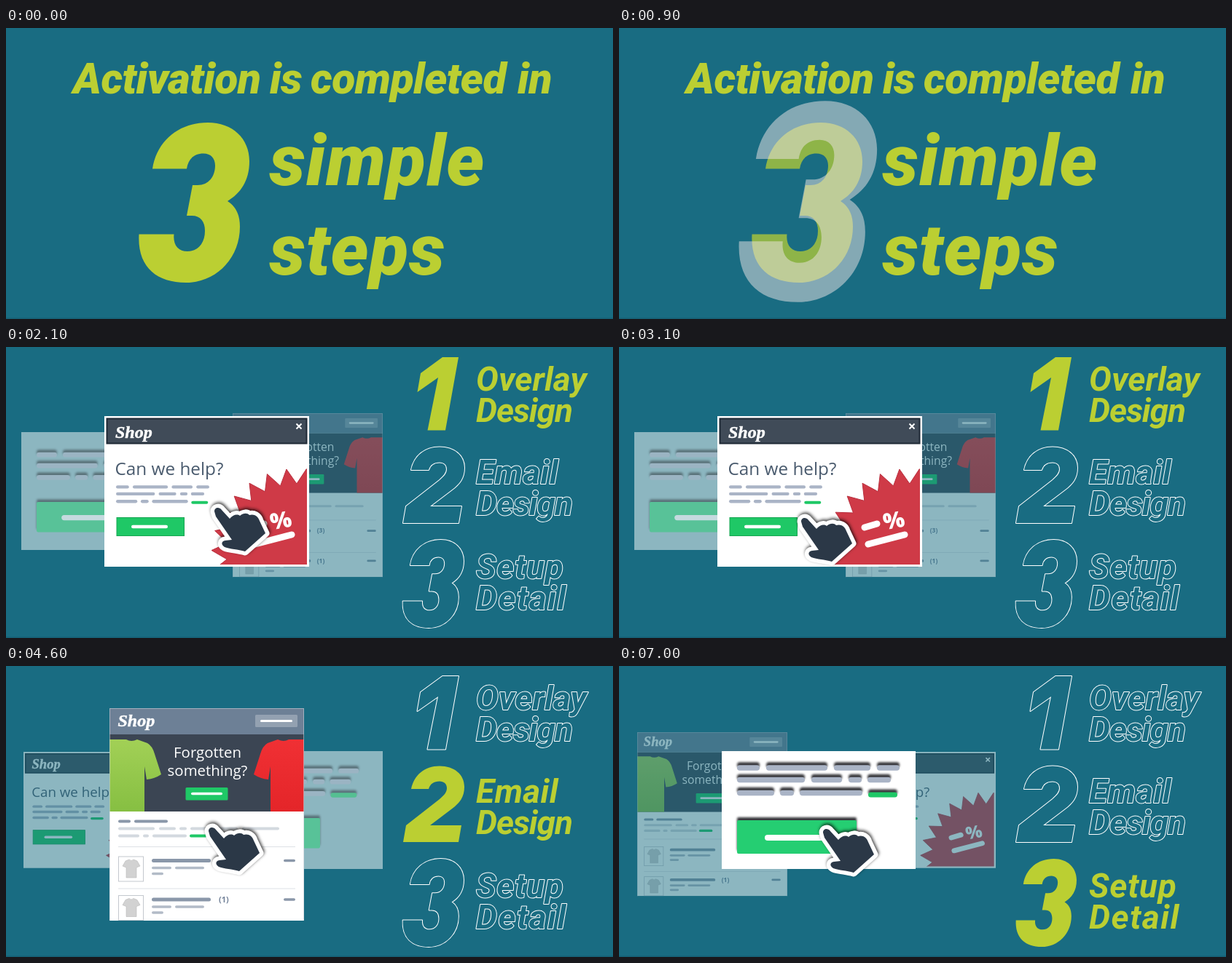
Write an HTML page that moves like this. It is 833 px wide and 400 px high and loops after 7500 ms.

```html
<!DOCTYPE html>
<html lang="en">
<head>
<meta charset="utf-8">
<title>Activation in 3 simple steps</title>
<style>
  html, body { margin: 0; width: 100%; height: 100%; overflow: hidden; background: #196c82; }
  svg { display: block; }
  .head { font: italic 900 59px Roboto, "Open Sans", sans-serif; letter-spacing: -.6px; fill: #bbcf32; }
  .big { font-size: 98px; letter-spacing: 1.2px; }
  .step text { font: italic 700 46px Roboto, "Open Sans", sans-serif; }
  .step { fill: #196c82; stroke: #fff; stroke-width: 2; paint-order: stroke; stroke-linejoin: round; }
  .step.on { fill: #bbcf32; stroke: none; }
  .logo { font: italic 700 24px "Liberation Serif", "Noto Serif", serif; fill: #fff; stroke: #fff; stroke-width: .5; }
  .ask { font: 24.3px "Open Sans", "Noto Sans", sans-serif; fill: #4a5b6e; }
  .lost { font: 20.4px "Open Sans", "Noto Sans", sans-serif; fill: #fff; text-anchor: middle; }
  .count { font: 700 11px "Open Sans", "Noto Sans", sans-serif; fill: #74839a; }
  .pct { font: 800 31px "Open Sans", "Noto Sans", sans-serif; fill: #fff; text-anchor: middle; }
  .raised { filter: drop-shadow(0 -4px 1.5px rgba(20, 20, 25, .85)); }
  .hand { fill: #2b3847; stroke: #fff; stroke-width: 11; stroke-linejoin: round; paint-order: stroke;
          filter: drop-shadow(1px -2px 2px rgba(0, 0, 0, .75)); }
</style>
</head>
<body>
<script>
const LOOP = 7500;
const GREY = '#8a97a9', PALE = '#d3d9df', GREEN = '#1fc866', LIME = '#bbcf32';

const THREE = 'M201 193.5C207 155 237 130 277 130C311 130 334 152 334 183C334 210 322 227 304 238' +
  'C315 245 321 256 321 273C321 317 288 350 247 350C206 350 180 328 182.5 283.5H230.5' +
  'C229 298 236 307 249 307C264 307 273 295 273 279C273 266 267 258 255 258H248L256 216H263' +
  'C278 216 287 204 287 189C287 179 281 172.5 271 172.5C258 172.5 250 180 248 193.5Z';
const TWO = 'M545 242L549 219L595 183C602 177 605 173 605 168C605 162 601 158.5 595 158.5' +
  'C587 158.5 582 162 580 169H556C560 150 574 137.5 595 137.5C615 137.5 629 149 629 166' +
  'C629 180 623 188 611 197L582 219H625L621 242Z';
const ONE = 'M599 14H621L603 114.5H578.5L593 42L564.5 62L569 36Z';
const HAND = 'M10 15C10 10 16 8 20 13L31 25C35 20 41 18 45 21C50 17 55 17 58 20C64 18 70 21 72 28' +
  'L80 45L52 70C42 67 32 67 24 64C19 61 19 56 25 55L34 54L12 22Z';
const SHIRT = 'M130 101H165Q172 105 180 101L194 106Q201 110 204 121L213 149Q204 155 193 156L190 138V200H130Z';
const TEE = 'm164 268 5-2q3 3 6 0l5 2 4 7-5 2v14h-14v-14l-5-2z';

const rect = (x, y, w, h, fill, more = '') =>
  `<rect x="${x}" y="${y}" width="${w}" height="${h}" fill="${fill}" ${more}/>`;
const path = (d, more = '') => `<path d="${d}" ${more}/>`;
const text = (x, y, cls, str, more = '') => `<text x="${x}" y="${y}" class="${cls}" ${more}>${str}</text>`;
const group = (attrs, ...kids) => `<g ${attrs}>${kids.join('')}</g>`;
const bar = (x, y, w, h, fill) => rect(x, y - h / 2, w, h, fill, `rx="${h / 2}"`);
const bars = (y, h, fill, ...spans) => spans.map(([a, b]) => bar(a, y, b - a, h, fill)).join('');
const use = (id, x = 0, y = 0, scale = 1, alpha = 1) =>
  `<use href="#${id}" transform="translate(${x} ${y}) scale(${scale})" opacity="${alpha}"/>`;

// Greeked paragraph shared by the overlay and the setup panel
const copy = bars(140, 7.5, '#aab4c6', [162, 193], [202, 286], [295, 345], [354, 385]) +
  bars(156.5, 7.5, '#aab4c6', [162, 255], [264, 306], [315, 333], [341, 373]) +
  bars(174.5, 7.5, '#aab4c6', [162, 213], [221, 240], [248, 334]) +
  bars(177, 7, GREEN, [342, 382]);

const setup = group('class="raised"', copy) +
  group('class="raised"', rect(162, 212, 164, 46, '#25ce72', 'rx="2"')) +
  bar(200, 236, 85, 8, '#fff');

function burst(cx, cy, outer, inner, spikes) {
  const points = [];
  for (let i = 0; i < spikes * 2; i++) {
    const a = (84 + i * 180 / spikes) * Math.PI / 180, r = i % 2 ? inner : outer;
    points.push((cx + r * Math.cos(a)).toFixed(1) + ',' + (cy - r * Math.sin(a)).toFixed(1));
  }
  return `<polygon points="${points.join(' ')}" fill="#cf3a47" stroke="#b92f3e"/>`;
}

const overlay = rect(135, 95, 281, 207, '#fff') +
  rect(138.5, 98.5, 274, 34, '#404b58', 'stroke="#1e2935" stroke-width="2"') +
  text(150, 125, 'logo', 'Shop') +
  path('M398.5 105.5l7 7m0-7l-7 7', 'stroke="#fff" stroke-width="2"') +
  text(149.5, 175.5, 'ask', 'Can we help?') +
  group('transform="translate(58 112.1) scale(.574)"', copy) +
  rect(152, 234.5, 92.5, 25, GREEN, 'stroke="#17a552" stroke-width="1"') +
  bar(172, 247, 50, 4.5, '#fff') +
  group('clip-path="url(#inOverlay)"', burst(400, 285, 118, 97, 27)) +
  group('stroke="#fff" stroke-width="9" stroke-linecap="round"',
    path('M337 248L354 243'), path('M342 271L392 258')) +
  text(377, 249, 'pct', '%', 'transform="rotate(-10 377 238)"');

const item = (dy, n) => group(`transform="translate(0 ${dy})"`,
  rect(154.5, 262, 34, 34, '#fff', 'stroke="#c3c8ce"'),
  path(TEE, 'fill="#d2d2d2" stroke="#b9b9b9" stroke-width=".6"'),
  bars(267.5, 5, GREY, [200, 281]),
  bars(277.5, 3.6, '#b2bbc7', [200, 227], [232, 272]),
  bars(285.5, 3.6, '#b2bbc7', [200, 216]),
  text(292, 271, 'count', `(${n})`),
  bars(267.5, 3.6, GREY, [381, 397]));

const email = group('clip-path="url(#inEmail)"',
  rect(142, 58, 267, 292, '#fff'),
  rect(142, 58, 267, 36, '#6d8096'),
  text(153.5, 83, 'logo', 'Shop'),
  rect(342, 67, 58, 17, '#93a1b1', 'rx="1.5"'), bar(349, 75.5, 44, 3, '#fff'),
  rect(142, 94, 267, 106, '#3b4553'),
  path(SHIRT, 'fill="url(#lime)"'),
  path(SHIRT, 'fill="url(#red)" transform="matrix(-1 0 0 1 553 0)"'),
  text(276.5, 125.5, 'lost', 'Forgotten'), text(276.5, 150.5, 'lost', 'something?'),
  rect(246.5, 167, 58, 17.5, GREEN, 'rx="1.5"'), bar(254, 175.5, 43, 3.6, '#fff'),
  bars(213.5, 4, GREY, [154, 171], [176, 222]),
  bars(223.5, 4, PALE, [154, 204], [210, 233], [238, 248], [253, 318], [324, 375]),
  bars(233.5, 4, PALE, [154, 183], [188, 196], [201, 248]),
  bars(233.5, 4, GREEN, [252, 276]),
  rect(154, 248, 243, 1, '#dde1e5'), item(0, 3),
  rect(154, 305.5, 243, 1, '#dde1e5'), item(53.5, 1),
  rect(142.5, 58.5, 266, 300, 'none', 'stroke="#c9d1d9" stroke-opacity=".6"'));

const step = (digit, ...words) =>
  group('class="step"', digit, ...words.map(([y, gap, w]) =>
    text(645, y, '', w, `style="letter-spacing:${gap}px"`)));

const steps = group('id="steps"',
  step(path(ONE), [60, .1, 'Overlay'], [103, -1.1, 'Design']),
  step(path(TWO), [188, .3, 'Email'], [231, -1.1, 'Design']),
  step(path(THREE, 'transform="translate(444.3 193.5) scale(.55)" vector-effect="non-scaling-stroke"'),
    [318, .8, 'Setup'], [361, 1.5, 'Detail']));

const title = text(92, 89.5, 'head', 'Activation') + text(362, 89.5, 'head', 'is') +
  text(418, 89.5, 'head', 'completed') + text(702, 89.5, 'head', 'in') +
  path(THREE, `id="solid" fill="${LIME}"`) +
  path(THREE, 'id="ghost" fill="#f0e6e8" transform="translate(259.5 238.5) scale(1.25 1.257) translate(-258.3 -240)"') +
  text(362, 216, 'head big', 'simple') + text(362, 338.5, 'head big', 'steps');

const SMALL = .7715, DIM = .5;
const dimSetup = (left, x, y) =>
  rect(left, 117, 240, 162, '#fff', `opacity="${DIM}"`) + use('setup', x, y, .9, DIM);

const scenes = [
  title,
  dimSetup(21, -103.8, 22.2) +
    use('email', 311 - 142 * SMALL, 91 - 58 * SMALL, SMALL, DIM) +
    use('overlay'),
  use('overlay', 24 - 135 * SMALL, 118 - 95 * SMALL, SMALL, DIM) +
    dimSetup(277, 137.6, 18.2) +
    use('email'),
  use('email', 25 - 142 * SMALL, 91 - 58 * SMALL, SMALL, DIM) +
    use('overlay', 517 - 416 * SMALL, 118 - 95 * SMALL, SMALL, DIM) +
    rect(141, 117, 266, 162, '#fff') + use('setup')
];

const gradient = (id, a, b) =>
  `<linearGradient id="${id}" x2="0" y2="1"><stop stop-color="${a}"/><stop offset="1" stop-color="${b}"/></linearGradient>`;

document.body.innerHTML = `<svg width="833" height="400" viewBox="0 0 833 400">
  <defs>
    ${gradient('lime', '#a2d056', '#86bf42')}${gradient('red', '#f03034', '#e42529')}
    <clipPath id="inOverlay">${rect(138, 132, 275, 167, '#000')}</clipPath>
    <clipPath id="inEmail">${rect(142, 58, 267, 292, '#000')}</clipPath>
    ${group('id="setup"', setup)}${group('id="overlay"', overlay)}${group('id="email"', email)}
  </defs>
  ${rect(0, 0, 833, 400, '#196c82')}${rect(0, 398.5, 833, 1.5, '#165f74')}
  ${scenes.map(s => group('class="scene"', s)).join('')}
  ${steps}
  ${path(HAND, 'id="hand" class="hand"')}
</svg>`;

// Each row: start in ms, then the pointer position
const moves = [
  [2100, 276, 211], [2300, 240, 225], [2500, 212, 240], [2700, 195, 246], [2900, 212, 240], [3100, 240, 225],
  [3600, 268, 212], [3800, 268, 164], [4000, 275, 158], [4200, 268, 164], [4400, 268, 185], [4600, 268, 212],
  [5100, 270, 214], [5300, 232, 192], [5400, 194, 167], [5500, 158, 143], [5600, 142, 122], [5700, 192, 113],
  [5800, 242, 111], [5900, 292, 114], [6000, 337, 125], [6100, 318, 144], [6200, 296, 162], [6300, 270, 180],
  [6400, 244, 198], [6600, 242, 212], [6800, 244, 198], [7000, 270, 214]
];
const cuts = [0, 2100, 3600, 5100];
const pulse = [0, .5, 1, .5];

const $ = id => document.getElementById(id);
const layers = document.querySelectorAll('.scene');
const items = document.querySelectorAll('.step');
const show = (el, on) => el.setAttribute('display', on ? 'inline' : 'none');

function draw(t) {
  const now = cuts.filter(c => c <= t).length - 1;
  layers.forEach((el, i) => show(el, i === now));
  items.forEach((el, i) => el.classList.toggle('on', i === now - 1));
  show($('steps'), now > 0);
  show($('hand'), now > 0);
  if (now === 0) {
    const level = t < 1600 ? pulse[Math.floor(t / 100) % 4] : 0;
    $('ghost').setAttribute('opacity', level);
    $('solid').setAttribute('opacity', 1 - level * .55);
  } else {
    const [, x, y] = moves.filter(m => m[0] <= t).pop();
    $('hand').setAttribute('transform', `translate(${x} ${y})`);
  }
}

const start = performance.now();
function tick() {
  draw((performance.now() - start) % LOOP);
  requestAnimationFrame(tick);
}
tick();
</script>
</body>
</html>
```
